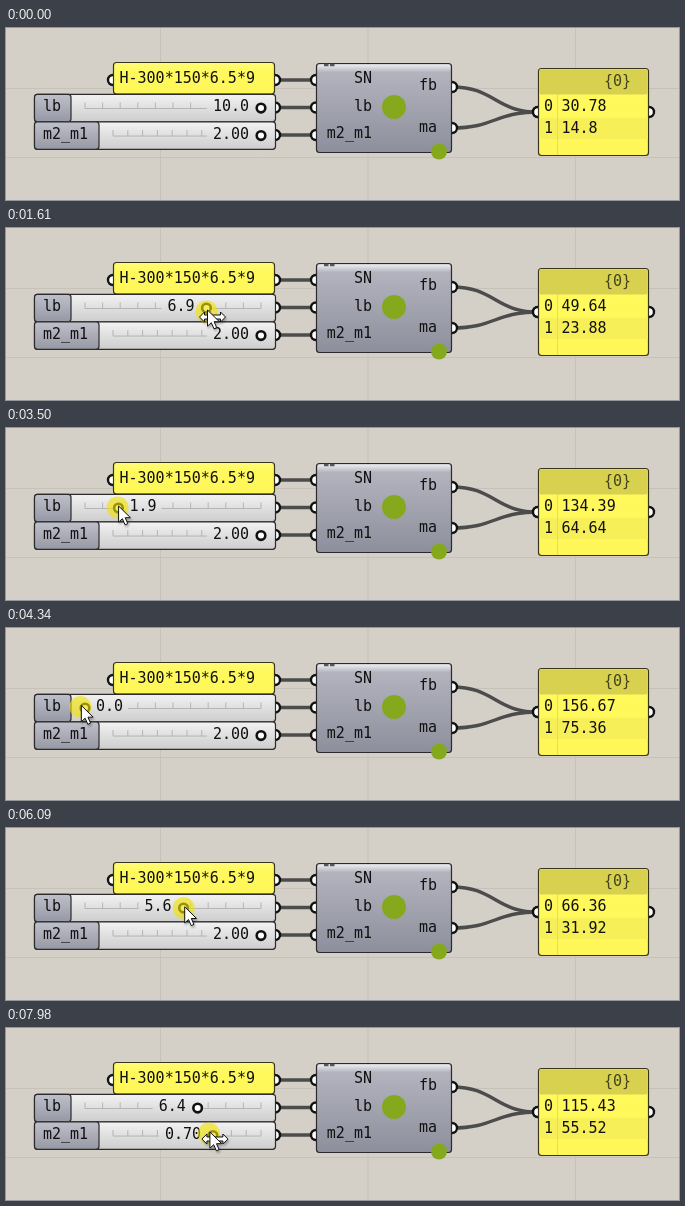
Write an HTML page that moves like this. It is 673 px wide and 172 px high and loops after 8 s.

```html
<!DOCTYPE html>
<html lang="en">
<head>
<meta charset="utf-8">
<title>Slider driven bending check</title>
<style>
  html, body { margin: 0; width: 100%; height: 100%; overflow: hidden; background: #d4d0c8; }
  svg { display: block; width: 673px; height: 172px; }
  text { font: 15px "DejaVu Sans Mono", "Noto Sans Mono", monospace; fill: #111; white-space: pre; }
  .pointer { filter: drop-shadow(1px 2px 1px rgba(0, 0, 0, .3)); }
</style>
</head>
<body>
<svg id="stage" viewBox="0 0 673 172">
  <defs>
    <linearGradient id="silver" x2="0" y2="1">
      <stop offset="0" stop-color="#f2f2f2"/><stop offset="1" stop-color="#cdcdcd"/>
    </linearGradient>
    <linearGradient id="label" x2="0" y2="1">
      <stop offset="0" stop-color="#bfc0ca"/><stop offset="1" stop-color="#9698a5"/>
    </linearGradient>
    <linearGradient id="body" x2="0" y2="1">
      <stop offset="0" stop-color="#b6b7c1"/><stop offset="1" stop-color="#8d8f9c"/>
    </linearGradient>
    <linearGradient id="shine" x2="0" y2="1">
      <stop offset="0" stop-color="#fff" stop-opacity=".75"/><stop offset="1" stop-color="#fff" stop-opacity="0"/>
    </linearGradient>
    <linearGradient id="paper" x2="0" y2="1">
      <stop offset="0" stop-color="#fffb78"/><stop offset=".3" stop-color="#fff95c"/><stop offset="1" stop-color="#fff758"/>
    </linearGradient>
  </defs>
</svg>
<script>
const LOOP = 8000, STEP = 70, ROW = 27.5;
const stage = document.getElementById('stage');

function add(tag, attrs, parent = stage) {
  const el = document.createElementNS('http://www.w3.org/2000/svg', tag);
  set(el, attrs);
  parent.append(el);
  return el;
}
function set(el, attrs) {
  for (const k in attrs) el.setAttribute(k, attrs[k]);
}
function label(x, y, str, attrs = {}) {
  const el = add('text', { x, y, ...attrs });
  el.textContent = str;
  return el;
}
const atEnd = { 'text-anchor': 'end' };
const path = (d, attrs, parent) => add('path', { d, fill: 'none', ...attrs }, parent);
const rect = (x, y, width, height, fill, attrs) => add('rect', { x, y, width, height, fill, ...attrs });
const box = (x, y, w, h, fill, stroke = '#2b2b2b') => rect(x, y, w, h, fill, { rx: 3, stroke, 'stroke-width': 1.2 });
const grip = (cx, cy) => add('circle', { cx, cy, r: 5, fill: '#fff', stroke: '#111', 'stroke-width': 2.4 });

// Canvas grid
const gridLine = { stroke: '#c6c2ba' };
for (let i = 0; i < 3; i++) path(`M${154.5 + 207.5 * i} 0v172`, gridLine);
for (let i = 0; i < 2; i++) path(`M0 ${60.5 + 69 * i}h673`, gridLine);

// Wires with a grip at each end
function wire(x1, y1, x2, y2) {
  const mid = (x1 + x2) / 2;
  path(`M${x1} ${y1}C${mid} ${y1} ${mid} ${y2} ${x2} ${y2}`, { stroke: '#4c4c4c', 'stroke-width': 3.4 });
  grip(x1, y1);
  grip(x2, y2);
}
const inputs = ['SN', 'lb', 'm2_m1'], outputs = ['fb', 'ma'];
inputs.forEach((_, i) => wire(269, 52 + ROW * i, 310, 52 + ROW * i));
outputs.forEach((_, i) => wire(446, 59 + 41 * i, 532, 84));
grip(107, 52);
grip(643, 84);

// Section name panel
box(107.5, 34.5, 161, 31.5, 'url(#paper)', '#38351a');
label(113.5, 55, 'H-300*150*6.5*9');

// Number sliders
function makeSlider({ name, y, split, from, min, max, digits }) {
  const to = 255, mid = y + ROW / 2, base = Math.round(mid + 3.3), px = (to - from) / (max - min);
  box(28.5, y, 241, ROW, 'url(#silver)');
  box(28.5, y, split - 28.5, ROW, 'url(#label)');
  label(37, base, name);
  const track = path('', { stroke: '#b4b4b4' });
  const value = label(0, base, '');
  const knob = add('circle', { cy: mid, r: 4.3, fill: '#fff', stroke: '#111', 'stroke-width': 2.6 });

  // Shows the value for a pointer position and returns it
  return at => {
    const num = (min + (Math.min(to, Math.max(from, at)) - from) / px).toFixed(digits);
    const x = from + (num - min) * px;
    const w = num.length * 9;
    const left = x > (from + to) / 2;
    const start = left ? x - 12 - w : x + 11;
    const gapA = left ? start - 6 : x - 6, gapB = left ? x + 6 : start + w + 5;
    let d = '';
    for (const [a, b] of [[from, gapA], [gapB, to]]) if (b > a) d += `M${a} ${mid + .5}H${b}`;
    for (let i = 0; i <= 10; i++) {
      const tick = from + (to - from) * i / 10;
      if (tick < gapA || tick > gapB) d += `M${tick} ${mid + .5}v-6`;
    }
    set(track, { d });
    set(knob, { cx: x });
    set(value, { x: start });
    value.textContent = num;
    return +num;
  };
}
const setLength = makeSlider({ name: 'lb', y: 66.3, split: 65, from: 79, min: 0, max: 10, digits: 1 });
const setRatio = makeSlider({ name: 'm2_m1', y: 93.8, split: 93, from: 107, min: -2, max: 2, digits: 2 });

// Component
box(310.5, 35.5, 135, 89, 'url(#body)');
rect(311.5, 36.5, 133, 8, 'url(#shine)', { rx: 2 });
path('M318 37h4.5m1.5 0h4.5', { stroke: '#55565c', 'stroke-width': 2.5 });
inputs.forEach((s, i) => label(366, Math.round(55 + ROW * i), s, atEnd));
outputs.forEach((s, i) => label(431, 62 + 42 * i, s, atEnd));
add('circle', { cx: 388, cy: 79, r: 12, fill: '#86a81c' });
add('circle', { cx: 433, cy: 123.5, r: 8, fill: '#86a81c' });

// Result panel
box(532.5, 40.5, 110, 87, 'url(#paper)', '#38351a');
rect(533.2, 41.2, 108.6, 25.3, '#d8d150', { rx: 2 });
rect(533.2, 90, 108.6, 21, '#f7ef58');
path('M551.5 67V127', { stroke: '#e6de52' });
label(625, 57.5, '{0}', { ...atEnd, style: 'fill:#45431c' });
const rows = outputs.map((_, i) => {
  const y = 82.5 + 22 * i;
  label(538, y, i);
  return label(555.5, y, '');
});

// Pointer
const halo = add('circle', { r: 11, fill: '#f0e200', 'fill-opacity': .62 });
const pointer = add('g', { class: 'pointer' });
const ink = { fill: '#fff', stroke: '#111' };
const arrows = path('M-8 7l5-5v3h16v-3l5 5l-5 5v-3h-16v3z', ink, pointer);
path('M0 0V16.2L3.8 12.7L6.5 18.8L9.2 17.6L6.6 11.7H11.8Z', ink, pointer);

// Key pointer positions: time, x, y
const route = [
  [0, 219, 178], [450, 258, 79], [840, 262, 127], [1050, 256, 80], [1610, 201.5, 82],
  [2450, 157.4, 78], [2730, 157.4, 78], [4060, 80, 78], [4600, 71, 77], [5460, 124, 78],
  [6250, 192.6, 79], [6350, 192.6, 79], [6720, 214, 98], [7000, 252, 107], [7980, 203.9, 104]
];
function locate(t) {
  const i = Math.max(1, route.findIndex(p => p[0] >= t));
  const [t0, x0, y0] = route[i - 1], [t1, x1, y1] = route[i];
  const k = (t - t0) / (t1 - t0);
  return [x0 + (x1 - x0) * k, y0 + (y1 - y0) * k];
}
const shown = on => ({ visibility: on ? 'visible' : 'hidden' });

// Allowable bending stress for unsupported length l and end moment ratio m
function stress(l, m) {
  const F = 235, limit = 1 / Math.sqrt(.6);
  const C = m > 1 ? 1 : Math.min(2.3, 1.75 + 1.05 * m + .3 * m * m);
  const p = m > 1 ? .3 : .6 + .3 * m;
  const elastic = C * Math.sqrt(2050580 + 74230 * l * l) / (l * l);
  const slender = Math.sqrt(F / 2.17 / elastic);
  if (slender > limit) return elastic;
  const safety = 1.5 + (slender / limit) ** 2 / 1.5;
  const loss = Math.max(0, .4 * (slender - p) / (limit - p));
  return F / safety * (1 - loss);
}

function draw(time) {
  const t = Math.floor(time % LOOP / STEP) * STEP;
  const [x, y] = locate(t);
  const first = t >= 1050 && t < 2590, second = t >= 2700 && t < 6350, third = t >= 7000;

  const l = setLength(locate(Math.min(6300, Math.max(1050, t)))[0] - 1);
  const m = setRatio(third ? x + 3 : 255);
  const fb = stress(l, m);
  rows[0].textContent = +fb.toFixed(2);
  rows[1].textContent = +(fb * .481).toFixed(2);

  set(pointer, { transform: `translate(${x} ${y})` });
  set(halo, { cx: x - 1, cy: y + 1.5, ...shown(first || second || third) });
  set(arrows, shown(first || third));
}

const begin = performance.now();
function tick() {
  draw(performance.now() - begin);
  requestAnimationFrame(tick);
}
tick();
</script>
</body>
</html>
```
